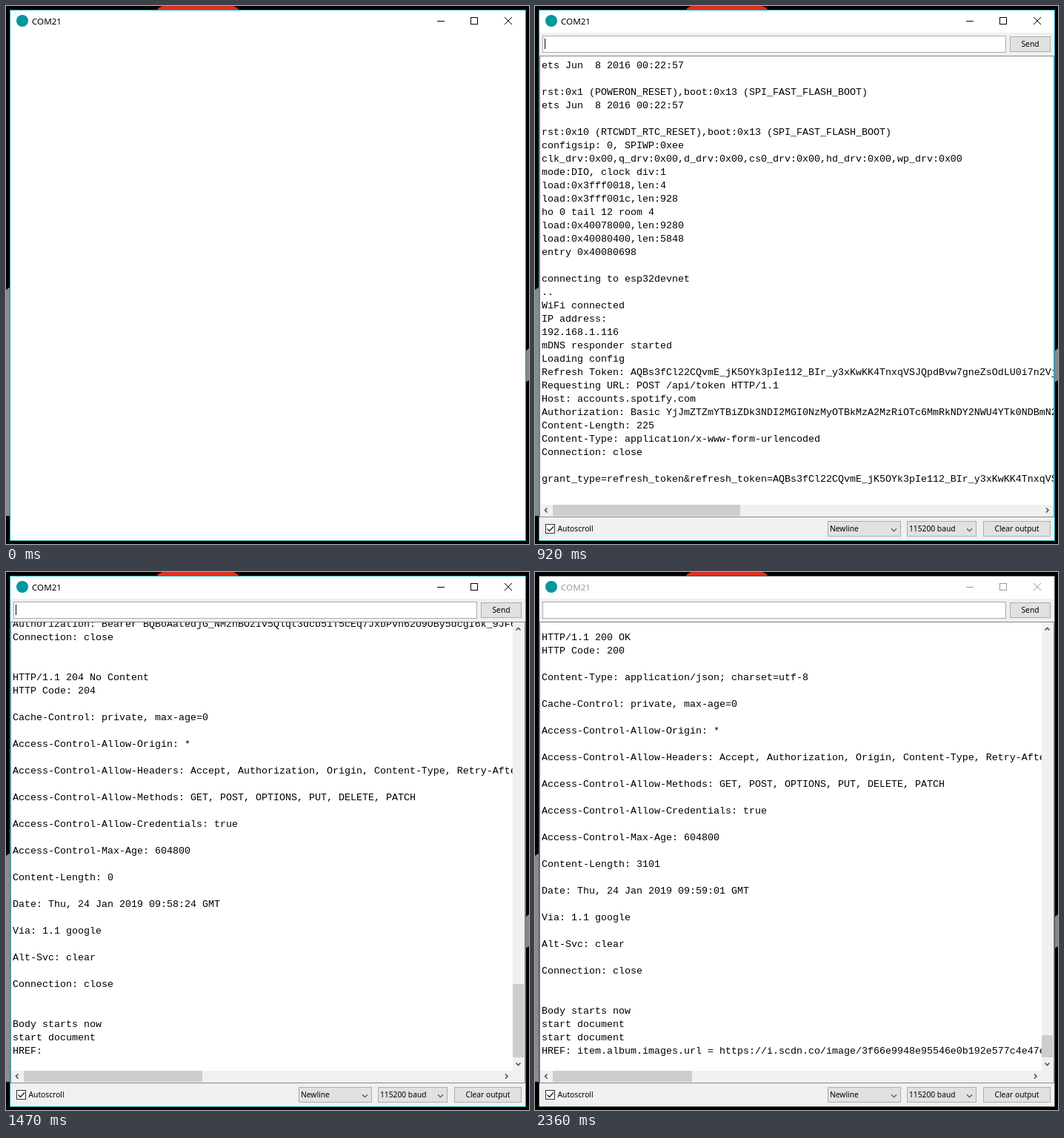
An HTML page with a canvas that plays this animation: 706 by 726 pixels, repeating every 2650 ms.

```html
<!DOCTYPE html>
<html lang="en">
<head>
<meta charset="utf-8">
<title>Serial monitor</title>
<style>
html, body { margin: 0; width: 100%; height: 100%; overflow: hidden; background: #000; }
canvas { display: block; }
</style>
</head>
<body>
<canvas id="stage" width="706" height="726"></canvas>
<script>
const ctx = document.getElementById('stage').getContext('2d', { alpha: false });
const LOOP = 2650;
const ROW = 18;
const VIEW = { left: 7, top: 68, right: 700, bottom: 689, bar: 16 };
const MONO = '13.333px "Liberation Mono", "Courier New", monospace';
const UI = '10.25px "Noto Sans", "Open Sans", sans-serif';
const TITLE = '11.6px "Noto Sans", "Open Sans", sans-serif';

// ---- Serial log ----
const refreshToken = 'AQBs3fCl22CQvmE_jK5OYk3pIe112_BIr_y3xKwKK4TnxqVSJQpdBvw7gneZsOdLU0i7n2Vj';
const accessToken = 'BQBoAatedjG_NMzhBOzIv5Qlqt3dcb5iT5cEq7JxbPvh62U9OBy5dcgI6k_9JF6';
const log = [
  'ets Jun  8 2016 00:22:57', '',
  'rst:0x1 (POWERON_RESET),boot:0x13 (SPI_FAST_FLASH_BOOT)',
  'ets Jun  8 2016 00:22:57', '',
  'rst:0x10 (RTCWDT_RTC_RESET),boot:0x13 (SPI_FAST_FLASH_BOOT)',
  'configsip: 0, SPIWP:0xee',
  'clk_drv:0x00,q_drv:0x00,d_drv:0x00,cs0_drv:0x00,hd_drv:0x00,wp_drv:0x00',
  'mode:DIO, clock div:1',
  'load:0x3fff0018,len:4',
  'load:0x3fff001c,len:928',
  'ho 0 tail 12 room 4',
  'load:0x40078000,len:9280',
  'load:0x40080400,len:5848',
  'entry 0x40080698', '',
  'connecting to esp32devnet',
  '..',
  'WiFi connected',
  'IP address:',
  '192.168.1.116',
  'mDNS responder started',
  'Loading config',
  'Refresh Token: ' + refreshToken,
  'Requesting URL: POST /api/token HTTP/1.1',
  'Host: accounts.spotify.com',
  'Authorization: Basic YjJmZTZmYTBiZDk3NDI2MGI0NzMyOTBkMzA2MzRiOTc6MmRkNDY2NWU4YTk0NDBmN2',
  'Content-Length: 225',
  'Content-Type: application/x-www-form-urlencoded',
  'Connection: close', '',
  'grant_type=refresh_token&refresh_token=' + refreshToken, ''
];

const stamp = s =>
  `Date: Thu, 24 Jan 2019 09:${58 + Math.floor(s / 60)}:${String(s % 60).padStart(2, '0')} GMT`;
const routing = ['Via: 1.1 google', 'Alt-Svc: clear', 'Connection: close'];
const cacheRule = 'Cache-Control: private, max-age=0';

function addResponse(status, headers, body) {
  log.push('HTTP/1.1 ' + status, 'HTTP Code: ' + parseInt(status), '');
  for (const header of headers) log.push(header, '');
  log.push('', 'Body starts now', 'start document', ...body);
}

addResponse('200 OK', ['Content-Type: application/json', cacheRule, stamp(12), ...routing],
  ['HREF: access_token = ' + accessToken, 'Token refreshed', '']);

const POLLS = 16, FIRST_TRACK = 9;
const asked = [], answered = [];
for (let i = 0; i < POLLS; i++) {
  const playing = i >= FIRST_TRACK;
  log.push('Requesting URL: GET /v1/me/player/currently-playing HTTP/1.1', 'Host: api.spotify.com',
    'Authorization: Bearer ' + accessToken, 'Connection: close', '', '');
  asked.push(log.length);
  addResponse(playing ? '200 OK' : '204 No Content', [
    ...(playing ? ['Content-Type: application/json; charset=utf-8'] : []),
    cacheRule,
    'Access-Control-Allow-Origin: *',
    'Access-Control-Allow-Headers: Accept, Authorization, Origin, Content-Type, Retry-After',
    'Access-Control-Allow-Methods: GET, POST, OPTIONS, PUT, DELETE, PATCH',
    'Access-Control-Allow-Credentials: true',
    'Access-Control-Max-Age: 604800',
    'Content-Length: ' + (playing ? (i < POLLS - 1 ? 3100 : 3101) : 0),
    stamp(15 + 3 * i + (i > 5 ? 1 : 0)),
    ...routing
  ], playing
    ? ['start document', 'HREF: item.album.images.url = https://i.scdn.co/image/3f66e9948e95546e0b192e577c4e47e']
    : ['HREF:']);
  answered.push(log.length);
}

// ---- Timeline: [start ms, printed lines, caret shown] ----
const steps = [
  [100, 0, 0], [150, 0, 1], [200, 3, 1], [270, 3, 0], [340, 15, 0], [370, 15, 1],
  [420, 15, 0], [460, 17, 0], [510, 17, 1], [550, 18, 1], [600, 21, 0],
  [640, 21, 1], [700, 23, 1], [760, 23, 0], [820, 24, 0], [870, 32, 0], [920, 32, 1],
  [940, 32, 0], [1030, 54, 0], [1110, asked[0], 1],
  [1210, answered[0], 1], [1230, asked[1], 1], [1290, answered[1], 0], [1320, asked[2], 0],
  [1380, answered[2], 1], [1400, asked[3], 1], [1470, answered[3], 1], [1490, asked[4], 0],
  [1600, answered[6], 1], [1730, answered[8], 0],
  [1790, answered[10], 0], [1890, answered[12], 0], [1990, answered[14], 0],
  [2260, asked[15], 0], [2360, answered[15], 0]
];
const BLUR_AT = 1730;

// ---- Drawing helpers ----
function rect(x, y, w, h, fill) {
  ctx.fillStyle = fill;
  ctx.fillRect(x, y, w, h);
}
function box(x, y, w, h, fill, edge) {
  rect(x, y, w, h, edge);
  rect(x + 1, y + 1, w - 2, h - 2, fill);
}
function poly(points, fill) {
  ctx.fillStyle = fill;
  ctx.beginPath();
  points.forEach(([x, y]) => ctx.lineTo(x, y));
  ctx.fill();
}
function line(points, color, width = 1) {
  ctx.strokeStyle = color;
  ctx.lineWidth = width;
  ctx.beginPath();
  points.forEach(([x, y]) => ctx.lineTo(x, y));
  ctx.stroke();
}
function text(str, x, y, font, color = '#000', align = 'left') {
  ctx.font = font;
  ctx.fillStyle = color;
  ctx.textAlign = align;
  ctx.fillText(str, x, y);
}
// Arrow head centred on x, y and pointing along dx, dy.
function chevron(x, y, dx, dy, size = 3, width = 1.6) {
  const tip = size / 2;
  line([
    [x - dx * tip - dy * size, y - dy * tip - dx * size],
    [x + dx * tip, y + dy * tip],
    [x - dx * tip + dy * size, y - dy * tip + dx * size]
  ], '#505050', width);
}
function button(x, y, w, h, label) {
  box(x, y, w, h, '#e1e1e1', '#adadad');
  text(label, x + w / 2, y + h / 2 + 3.5, UI, '#000', 'center');
}
function combo(x, w, label) {
  box(x, 695, w, 21, '#e1e1e1', '#adadad');
  text(label, x + 3, 709, UI);
  chevron(x + w - 9.5, 707, 0, 1, 3.5, 1.1);
}

// ---- Scene parts ----
function drawDesktop() {
  rect(0, 0, 706, 726, '#000');
  poly([[203, 6], [206, 2.5], [211, 0], [307, 0], [312, 2.5], [315, 6]], '#dc2f23');
  poly([[0, 383], [6, 379], [6, 688], [0, 688]], '#8e888a');
  poly([[701, 466], [706, 462], [706, 505], [701, 508]], '#868686');
}

function drawWindow(active) {
  const ink = active ? '#000' : '#999';
  box(5, 5, 697, 717, '#fff', active ? '#18a0b4' : '#555');
  ctx.fillStyle = '#00979c';
  ctx.beginPath();
  ctx.arc(22, 20, 8, 0, Math.PI * 2);
  ctx.fill();
  text('COM21', 35, 25, TITLE, ink);
  rect(582, 20, 10, 1, ink);
  box(627, 15, 10, 10, '#fff', ink);
  line([[673, 15], [683, 25]], ink);
  line([[683, 15], [673, 25]], ink);
}

function drawControls(caret) {
  rect(6, 36, 695, 685, '#f0f0f0');
  box(10, 40, 626, 23, '#fff', '#abadb3');
  if (caret) rect(13, 44, 1, 14, '#000');
  button(641, 41, 55, 21, 'Send');
  box(6, 67, 695, 623, '#fff', '#828790');
  box(14, 699, 13, 13, '#fff', '#333');
  line([[16.5, 705.5], [19.5, 708.5], [25, 702.5]], '#222', 1.3);
  text('Autoscroll', 30.5, 709, UI);
  combo(395, 99, 'Newline');
  combo(502, 94, '115200 baud');
  button(605, 695, 91, 21, 'Clear output');
}

function contentWidth(count) {
  if (count >= answered[FIRST_TRACK]) return 2315;
  return count >= 32 ? 1806 : count >= 24 ? 1190 : 0;
}

function drawLog(count) {
  const scroll = Math.max(0, count * ROW - 584);
  const width = contentWidth(count);
  const right = VIEW.right - (scroll ? VIEW.bar : 0);
  const bottom = VIEW.bottom - (width ? VIEW.bar : 0);

  ctx.save();
  ctx.beginPath();
  ctx.rect(VIEW.left, VIEW.top, right - VIEW.left, bottom - VIEW.top);
  ctx.clip();
  for (let i = Math.max(0, Math.floor(scroll / ROW) - 1); i < count; i++) {
    text(log[i], 9, 84 + i * ROW - scroll, MONO);
  }
  ctx.restore();

  if (width) {
    rect(VIEW.left, bottom, VIEW.right - VIEW.left, VIEW.bar, '#f0f0f0');
    const track = right - 17 - 24;
    rect(24, bottom, Math.round(track * (right - VIEW.left) / width), 15, '#cdcdcd');
    chevron(15, bottom + 7.5, -1, 0);
    chevron(right - 8.5, bottom + 7.5, 1, 0);
  }
  if (scroll) {
    rect(right, VIEW.top, VIEW.bar, bottom - VIEW.top, '#f0f0f0');
    const thumb = Math.round(570 * 604 / (count * ROW));
    rect(right, 655 - thumb, 15, thumb, '#cdcdcd');
    chevron(right + 7.5, 77, 0, -1);
    chevron(right + 7.5, 664, 0, 1);
  }
}

function render(time) {
  const step = steps.filter(([start]) => start <= time).pop();
  drawDesktop();
  drawWindow(time < BLUR_AT);
  if (!step) return;
  const [, count, caret] = step;
  drawControls(caret);
  drawLog(count);
}

const began = performance.now();
function tick() {
  render((performance.now() - began) % LOOP);
  requestAnimationFrame(tick);
}
tick();
</script>
</body>
</html>
```
